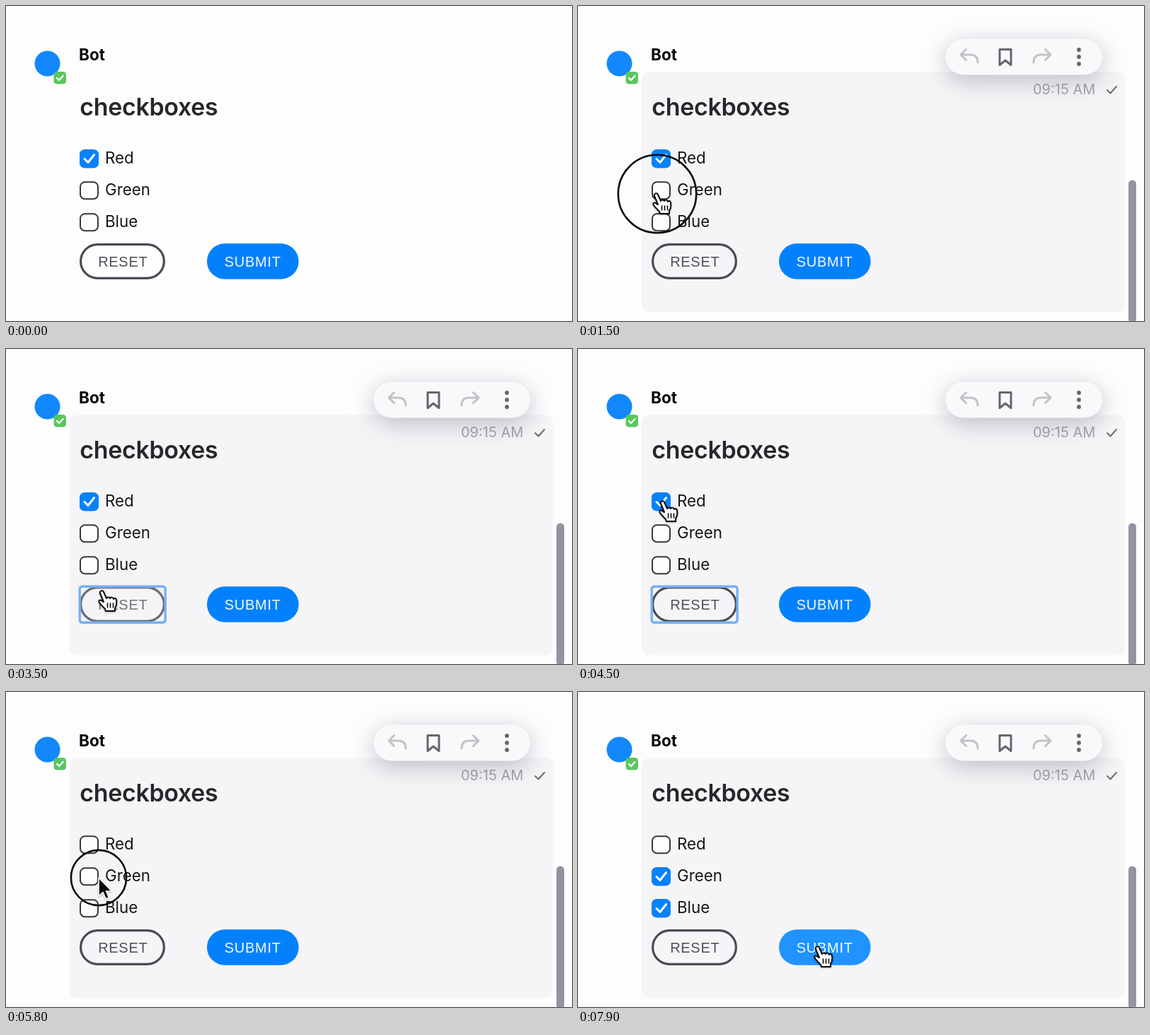
Animation of 800x446 px, one loop 8000 ms. Source, as an HTML page:

```html
<!DOCTYPE html>
<html lang="en">
<head>
<meta charset="utf-8">
<title>Checkbox form</title>
<style>
  html, body { margin: 0; width: 100%; height: 100%; overflow: hidden; background: #fefdfe; }
  svg { display: block; width: 100vw; height: 100vh; }
  text { font-family: Inter, "Open Sans", sans-serif; fill: #161618; white-space: pre; }
  .label { font-size: 22.3px; }
  .button { font: 20px "Liberation Sans", sans-serif; letter-spacing: .7px; }
  .line { fill: none; stroke-linecap: round; stroke-linejoin: round; }
  #bar { filter: drop-shadow(0 7px 17px rgba(60, 60, 90, .32)); }
  #cursor { filter: drop-shadow(0 1.5px 1px rgba(0, 0, 0, .3)); }
</style>
</head>
<body>
<svg viewBox="0 0 800 446">
  <g id="hover">
    <rect x="90" y="93.5" width="683" height="340" rx="10" fill="#f5f4f6"/>
    <rect x="778" y="246.5" width="11" height="202" rx="5.5" fill="#9493a1"/>
    <text x="643" y="124.5" font-size="20" style="fill:#a4a3a8">09:15 AM</text>
    <path class="line" d="M748 119l4.5 4.5 8.5-9.5" stroke="#6e6e73" stroke-width="2"/>
    <rect id="bar" x="519.5" y="46.5" width="221.5" height="51" rx="25.5" fill="#f9f8fa"/>
    <g class="line" stroke="#c3c2c6" stroke-width="3">
      <path d="M548.5 61.5l-7.5 7.5 7.5 7.5M542 69h13q10 0 10 11"/>
      <path d="M660.5 61.5l7.5 7.5-7.5 7.5M667 69h-13q-10 0-10 11"/>
    </g>
    <path class="line" d="M596 61.5h16v22l-8-6.5-8 6.5z" stroke="#66656b" stroke-width="3"/>
    <path class="line" d="M708 62v0M708 72v0M708 82v0" stroke="#66656b" stroke-width="5.8"/>
  </g>

  <circle cx="58.5" cy="81.5" r="18" fill="#1288fc"/>
  <rect x="67.5" y="93" width="17.5" height="17.5" rx="4.5" fill="#5ac660"/>
  <path class="line" d="M72 102l3 3 5.5-6" stroke="#fff" stroke-width="2.4"/>

  <text x="103" y="77" font-size="22.5" font-weight="700" style="fill:#050505">Bot</text>
  <text x="104.3" y="154.5" font-size="34" font-weight="600" letter-spacing="-.35" style="fill:#27272b">checkboxes</text>

  <g id="boxes"></g>

  <rect id="reset" x="105.6" y="337.6" width="117.8" height="47.8" rx="23.9" fill="none" stroke="#4a4b54" stroke-width="3.2"/>
  <text id="resetText" class="button" x="130.2" y="369" style="fill:#4f5058">RESET</text>
  <rect id="focus" x="104.2" y="336.2" width="121" height="51" rx="3.5" fill="none" stroke="#74b0f4" stroke-width="3.4"/>
  <rect id="submit" x="284" y="336.3" width="129.7" height="50.4" rx="25.2" fill="#0381fd"/>
  <text class="button" x="308.8" y="369" style="fill:#f6faff">SUBMIT</text>

  <circle id="ring" fill="none" stroke="#0b0b0b" stroke-width="2.6"/>
  <g id="cursor" stroke-linejoin="round" stroke-linecap="round">
    <path id="arrow" d="M0 0v26l6-5.5 4 9.5 4.5-2-4-9h8z" fill="#0a0a0a" stroke="#fff" stroke-width="1.6"/>
    <g id="hand" stroke="#0a0a0a" stroke-width="2">
      <path fill="#fff" d="M-4 3C-5-1 0-2 1 1L5 10C6 8 9 8 10 10 11 8 14 8 15 11 17 9 19 10 19 13 20 18 19 21 17 24V28H4L3 25C0 22-3 19-5 16-7 13-4 11-1 14L1 15Z"/>
      <path fill="none" stroke-width="1.6" d="M6.5 17v6M10.5 17v6M14.5 17v6"/>
    </g>
  </g>
</svg>
<script>
const LOOP = 8000, STEP = 100, START = 100;
const RING_MAX = 69, RING_TIME = 120, RESPONSE = 160;
const el = id => document.getElementById(id);
const clamp = v => Math.max(0, Math.min(1, v));
const mix = (a, b, k) => a + (b - a) * k;
const show = (node, on) => { node.style.display = on ? '' : 'none'; };

const rowTop = i => 203.2 + 45 * i;
const areas = {
  reset: { x: 104, y: 336, w: 121, h: 51 },
  submit: { x: 284, y: 336, w: 130, h: 51 }
};
const colours = ['Red', 'Green', 'Blue'];
colours.forEach((name, i) => { areas[name] = { x: 104, y: rowTop(i), w: 26.5, h: 26 }; });

// The cursor rests at each stop until `leave`; `click` is the moment it presses `on`.
const stops = [
  { arrive: START, leave: START, x: 0, y: 322 },
  { arrive: 600, leave: 700, x: 46, y: 292 },
  { arrive: 1100, leave: 1600, x: 112, y: 266, click: 1404, on: 'Green' },
  { arrive: 1800, leave: 2100, x: 118, y: 309, click: 1824, on: 'Blue' },
  { arrive: 2400, leave: 2500, x: 152, y: 343 },
  { arrive: 2700, leave: 2900, x: 119, y: 215, click: 2724, on: 'Red' },
  { arrive: 3100, leave: 3600, x: 137, y: 343, click: 3232, on: 'reset' },
  { arrive: 4400, leave: 4700, x: 121, y: 216, click: 4524, on: 'Red' },
  { arrive: 5600, leave: 6100, x: 131, y: 263, click: 5732, on: 'Green' },
  { arrive: 6700, leave: 6700, x: 122, y: 297 },
  { arrive: 6800, leave: 7600, x: 129, y: 301, click: 6824, on: 'Blue' },
  { arrive: 7900, leave: LOOP, x: 340, y: 361 }
];
const clicks = stops.filter(stop => stop.click);

el('boxes').innerHTML = colours.map((name, i) => `
  <g transform="translate(104 ${rowTop(i)})">
    <rect x="1" y="1" width="25" height="24" rx="6.5" fill="#fefdfe" stroke="#38383d" stroke-width="2"/>
    <g id="tick${name}">
      <rect width="27" height="26" rx="7" fill="#0582fd"/>
      <path class="line" d="M7 13.3l5 5L20.5 7.5" stroke="#fff" stroke-width="3"/>
    </g>
    <text class="label" x="36" y="19.8">${name}</text>
  </g>`).join('');

function cursorAt(t) {
  const i = Math.max(0, stops.findLastIndex(stop => stop.arrive <= t));
  const from = stops[i], to = stops[i + 1] || from;
  const k = clamp((t - from.leave) / (to.arrive - from.leave || 1));
  const ease = k * k * (3 - 2 * k);
  return { x: mix(from.x, to.x, ease), y: mix(from.y, to.y, ease) };
}

// Replays the clicks so far: a box toggles, reset restores the defaults.
function formAt(t) {
  let checked = new Set(['Red']), focus = false;
  for (const { click, on } of clicks) {
    if (t < click + RESPONSE) break;
    focus = on === 'reset';
    if (focus) checked = new Set(['Red']);
    else if (!checked.delete(on)) checked.add(on);
  }
  return { checked, focus };
}

function drawRing(t) {
  const ring = el('ring');
  const stop = clicks.find(({ click }) => t >= click && t < click + 2 * RING_TIME);
  show(ring, stop);
  if (!stop) return;
  const age = (t - stop.click) / RING_TIME;
  ring.setAttribute('cx', stop.x);
  ring.setAttribute('cy', stop.y);
  ring.setAttribute('r', RING_MAX * clamp(age));
  ring.setAttribute('opacity', 1 - clamp(age - 1));
}

function draw(t) {
  const { x, y } = cursorAt(t), { checked, focus } = formAt(t);
  const over = a => x >= a.x && x <= a.x + a.w && y >= a.y && y <= a.y + a.h;
  const onReset = over(areas.reset), onLink = Object.values(areas).some(over);

  el('hover').setAttribute('opacity', clamp((t - 700) / 400));
  colours.forEach(name => show(el('tick' + name), checked.has(name)));
  show(el('focus'), focus);
  el('reset').setAttribute('stroke', onReset ? '#696a73' : '#4a4b54');
  el('resetText').style.fill = onReset ? '#73747b' : '#4f5058';
  el('submit').setAttribute('fill', over(areas.submit) ? '#2093ff' : '#0381fd');
  drawRing(t);
  show(el('cursor'), t >= START);
  show(el('arrow'), !onLink);
  show(el('hand'), onLink);
  el('cursor').setAttribute('transform', `translate(${x} ${y})`);
}

const start = performance.now();
function tick() {
  const t = (performance.now() - start) % LOOP;
  draw(Math.floor(t / STEP) * STEP);
  requestAnimationFrame(tick);
}
tick();
</script>
</body>
</html>
```
